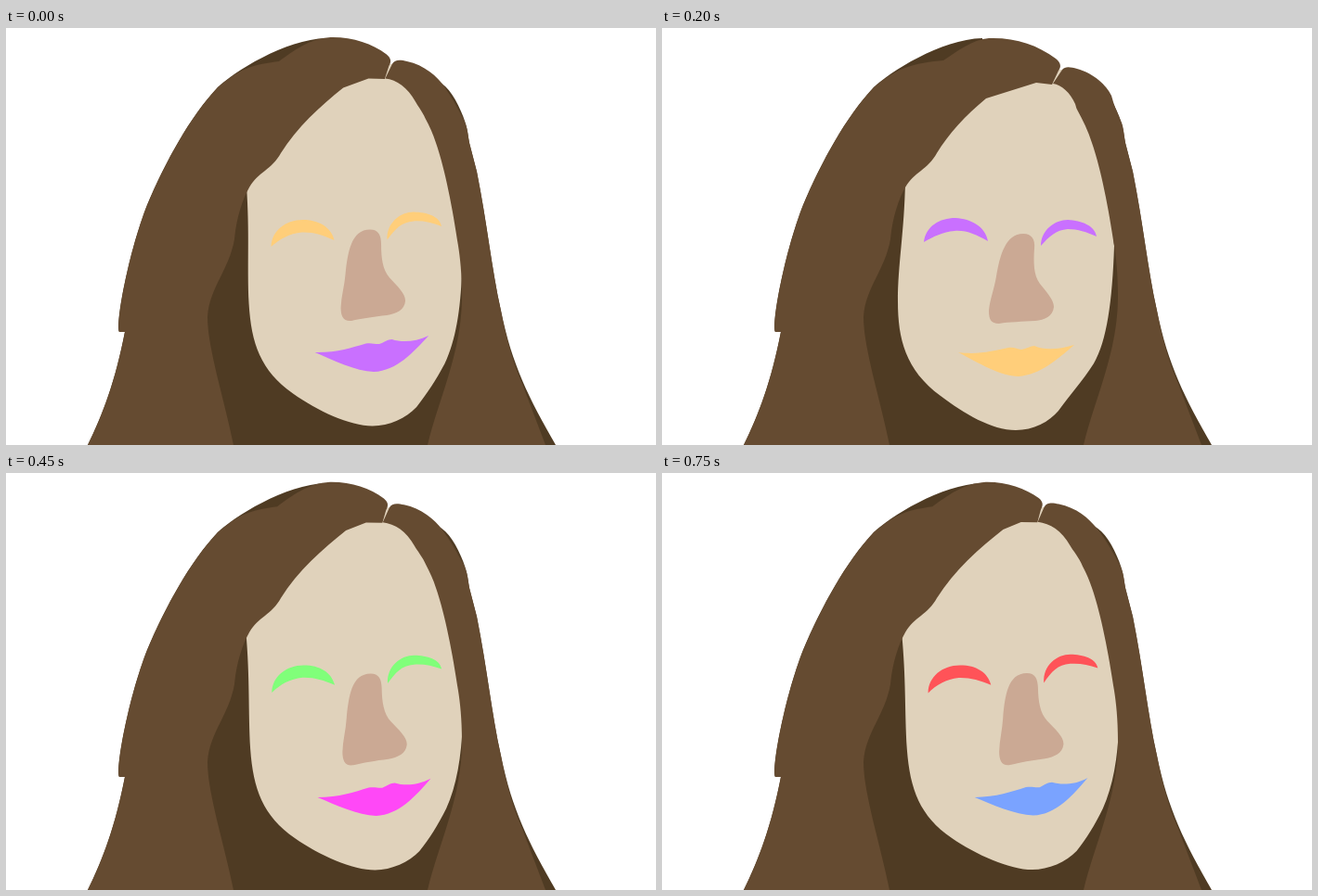
Write an HTML page with a canvas that moves like this. It is 700 by 450 pixels and loops after 0.8 s.

```html
<!DOCTYPE html>
<html lang="en">
<head>
<meta charset="utf-8">
<title>Turning head</title>
<style>
html, body { margin: 0; width: 100%; height: 100%; overflow: hidden; background: #fff; }
canvas { display: block; }
</style>
</head>
<body>
<canvas id="stage" width="700" height="450"></canvas>
<script>
const ctx = document.getElementById('stage').getContext('2d');
const FRAME_MS = 50, FRAMES = 16;
const DARK = '#4f3b23', BROWN = '#654b31', SKIN = '#e0d2bb', NOSE = '#cba994';
const RAINBOW = ['#ffce7a', '#80ff7a', '#80ffff', '#7aa3ff', '#c970ff', '#ff48f7', '#ff4fa7', '#ff5358'];

// Head turn over the loop: [frame, amount], 0 = lowered, 1 = raised.
const TURN = [[0, .505], [2, .2], [4, 0], [7, .35], [9, .61], [12, 1.02], [13, 1], [15, .655], [16, .505]];

// Each moving outline has a lowered and a raised pose.
const face = [
  'M262 165C261 220 254 255 254 295C254 335 262 369 300 397C325 416 355 434 381 434C400 434 417 425 427 413C440 395 452 382 465 362C479 338 485 295 487 235C486 200 470 100 440 60L400 45L300 100Z',
  'M256 175C264 225 265 255 269 300C274 345 286 371 318 392C345 410 385 425 408 425C425 425 445 417 457 405C467 393 473 380 480 362C489 338 494 315 495 290C494 200 470 100 440 60L385 40L300 100Z'
];
const parting = [
  'M418 62L427 45L431 45L424 62Z',
  'M394 51L399 33L402 32L399 51Z'
];
const leftCrown = [
  'C238 56 249 48 259 44C274 38 290 36 303 35C318 25 335 12 352 11C380 10 404 18 424 33C430 38 430 42 427 46L420 61L403 59L349 76C327 94 308 115 296 135',
  'C238 56 247 48 256 45C266 40 276 39 285 37C302 24 318 11 347 9C366 9 384 15 396 24C401 28 400 32 398 36L396 49L378 50L377 53C350 74 318 100 296 135'
];
const rightCrown = [
  'M463 124C459 111 453 99 447 88C446 86 446 85 445 82C440 70 430 61 421 60L431 45C434 41 440 42 447 44C465 49 479 62 484 73C487 84 489 88 494 100',
  'M463 124C461 118 459 113 456 107C451 94 440 82 437 77C425 58 412 51 396 49L401 33C404 26 410 27 417 28C436 31 450 42 461 54C472 64 480 78 489 92'
];
const nose = [
  'M389 222C398 222 402 228 401 238C400 252 400 267 407 276C414 285 422 293 422 301C421 311 412 315 402 316C388 317 374 317 363 319C354 319 352 314 352 305C353 293 358 281 360 268C364 245 370 222 389 222Z',
  'M395 213C404 213 406 219 407 229C408 244 411 255 419 263C428 272 438 279 438 288C437 298 428 302 418 304C405 306 390 310 381 313C372 315 369 308 369 298C369 286 371 275 371 263C372 240 373 213 395 213Z'
];
const leftEye = [
  'M282 231C284 214 299 205 316 205C333 206 348 214 351 230C338 223 328 218 315 219C302 220 293 225 282 231Z',
  'M289 241C288 223 304 209 323 209C340 208 352 215 356 228C344 224 334 222 322 222C308 224 297 230 289 241Z'
];
const rightEye = [
  'M408 235C408 218 423 207 437 207C452 208 466 213 468 225C457 220 448 217 437 217C424 218 417 225 408 235Z',
  'M413 222C411 202 427 190 441 190C455 190 468 193 470 203C460 200 451 199 441 200C427 201 421 209 413 222Z'
];
const mouth = [
  'M319 350C342 353 357 348 373 345C379 344 383 347 387 347C393 346 397 343 401 343C412 348 427 347 444 342C425 358 408 374 384 376C365 376 340 361 319 350Z',
  'M346 350C370 348 386 342 402 336C408 335 413 336 417 335C422 332 425 329 430 329C440 331 454 331 466 322C452 342 433 366 408 366C388 365 364 356 346 350Z'
];

// Still parts of the hair.
const leftOutside = 'M88 450C104 418 118 380 128 328L122 328C118 318 132 242 152 191C172 144 198 96 228 64';
const leftInside = 'C286 153 272 155 262 172C255 184 248 205 246 228C240 262 219 280 217 312C217 345 235 400 245 450Z';
const rightOutside = 'C497 106 497 112 499 124L507 155C518 210 523 260 533 305';
const rightInside = 'C540 342 547 362 556 384L581 450L454 450C466 400 491 350 491 290C491 265 489 248 487 235C481 195 473 153 463 124Z';
const backHair = leftOutside +
  'C245 48 300 12 345 11L345 60L461 60L461 55C473 60 482 71 490 90' +
  rightOutside + 'C545 364 563 399 592 450Z';

function morph([low, high], k) {
  const ends = high.match(/\d+/g);
  let i = 0;
  return low.replace(/\d+/g, n => (+n + (ends[i++] - n) * k).toFixed(2));
}

function fill(path, color) {
  ctx.fillStyle = color;
  ctx.fill(new Path2D(path));
}

function turnAt(frame) {
  const i = TURN.findIndex(([f]) => f > frame);
  const [f0, k0] = TURN[i - 1], [f1, k1] = TURN[i];
  return k0 + (k1 - k0) * (frame - f0) / (f1 - f0);
}

function draw(now) {
  const frame = Math.floor(now / FRAME_MS) % FRAMES;
  const k = turnAt(frame);
  const eyeColor = RAINBOW[frame % 8], mouthColor = RAINBOW[(frame + 4) % 8];

  ctx.fillStyle = '#fff';
  ctx.fillRect(0, 0, 700, 450);
  fill(backHair, DARK);
  fill(morph(parting, k), SKIN);
  fill(morph(face, k), SKIN);
  fill(leftOutside + morph(leftCrown, k) + leftInside, BROWN);
  fill(morph(rightCrown, k) + rightOutside + rightInside, BROWN);
  fill(morph(nose, k), NOSE);
  fill(morph(leftEye, k), eyeColor);
  fill(morph(rightEye, k), eyeColor);
  fill(morph(mouth, k), mouthColor);
}

let start;
function tick(now) {
  start ??= now;
  draw(now - start);
  requestAnimationFrame(tick);
}
draw(0);
requestAnimationFrame(tick);
</script>
</body>
</html>
```
